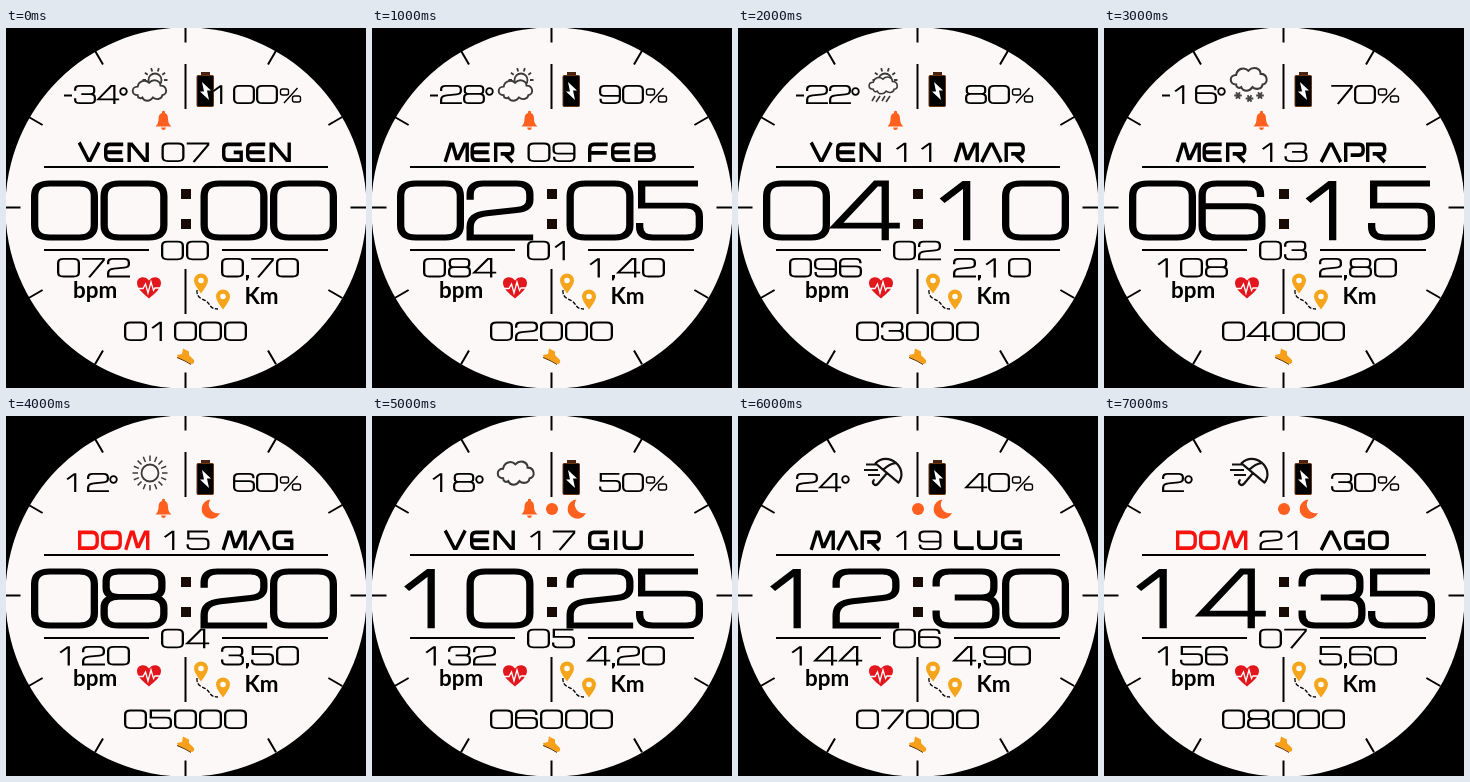
An HTML page that plays this animation: 360 by 360 pixels, repeating every 8000 ms.

```html
<!DOCTYPE html>
<html lang="it">
<head>
<meta charset="utf-8">
<style>
html, body { margin: 0; width: 100%; height: 100%; overflow: hidden; background: #000; }
svg { display: block; width: 100vw; height: 100vh; }
.ink { fill: none; stroke: #000; }
.label { font: 700 22.4px Lato, sans-serif; }
</style>
</head>
<body>
<svg viewBox="0 0 360 360" role="img" aria-label="Quadrante digitale">
  <rect width="360" height="360"/>
  <circle cx="180" cy="180" r="180.600" fill="#fdf8f8"/>
  <g id="ticks" class="ink" stroke-width="2"></g>
  <path class="ink" stroke-width="2" d="M179.5 36V81M38 139H322M38 222H143M216 222H322M179.5 241V286"/>
  <path d="M175 161h10v10h-10zM175 191h10v10h-10z" fill="#180b06"/>
  <text class="label" x="67" y="269.500">bpm</text>
  <text class="label" x="238.500" y="275.500">Km</text>

  <g id="battery">
    <path d="M195 44h9v4h-9z" fill="#4a2410"/>
    <rect x="191" y="47.500" width="16.500" height="31" rx="1" stroke="#6b3512"/>
    <path d="M196 54L205 62.500H201L203 72L194 63.500H198Z" fill="#fff"/>
  </g>

  <g id="heart">
    <path d="M143 270.500C137 265.500 131 260.500 131 255C131 248.500 139.500 247 143 252.500C146.500 247 155 248.500 155 255C155 260.500 149 265.500 143 270.500Z" fill="#e2171d"/>
    <path d="M131 260.500H137L139.500 256L142 265L145 254L147.500 262.500L149 260H155" fill="none" stroke="#fff" stroke-width="1.300"/>
  </g>

  <g id="route">
    <path d="M191 262C190 270 197 271 200 273C205 276 203 281 212 281" class="ink" stroke-width="1.300" stroke-dasharray="4 1.500"/>
    <g id="pins" fill="#f5a51c"></g>
  </g>

  <g id="shoe">
    <path d="M177 320.500L183 323.500V327L188 332Q189 336 185 336L179 332.500L172 330L171 327L176 326Z" fill="#f9a01b"/>
    <path d="M171 329.500L179 333L185 336.500" fill="none" stroke="#5a3200"/>
  </g>

  <g id="live"></g>
</svg>
<script>
const $ = id => document.getElementById(id);
const STEP = 1000, COUNT = 8;
const ORANGE = '#ff5f1f', RED = '#f8120e', GREY = '#3a3a3a', PAPER = '#fdf8f8';

// Digit centre lines on a 9 x 10 grid
const DIGITS = [
  'M2.3 0H6.700Q9 0 9 2.300V7.700Q9 10 6.700 10H2.300Q0 10 0 7.700V2.300Q0 0 2.300 0Z',
  'M.9 3.200L4.200 .1H4.600V10.500',
  'M0 3V2Q0 0 2 0H7Q9 0 9 2V3Q9 4.700 7 4.900L2.500 5.500Q0 5.800 0 8V10H9.500',
  'M0 2.800V2Q0 0 2 0H6.900Q8.700 0 8.700 1.800V3Q8.700 4.800 6.900 4.800H2.800M6.900 4.800Q9 4.800 9 6.900V8Q9 10 7 10H2Q0 10 0 8V7.200',
  'M9.600 7.800H0L6 0H7.400V10.500',
  'M8.800 0H.3V4.100H7Q9 4.100 9 6.100V8Q9 10 7 10H2Q0 10 0 8V7.300',
  'M8.800 2.500V2Q8.800 0 6.800 0H2.200Q0 0 0 2.200V7.800Q0 10 2.200 10H6.800Q9 10 9 8V6.200Q9 4.200 6.800 4.200H0',
  'M-.4 0H8.900V.8L2.600 10.500',
  'M2.200 4.700Q.3 4.700 .3 3V1.800Q.3 0 2.200 0H6.800Q8.700 0 8.700 1.800V3Q8.700 4.700 6.800 4.700ZM2.200 4.700H6.800Q9 4.700 9 6.700V8Q9 10 6.800 10H2.200Q0 10 0 8V6.700Q0 4.700 2.200 4.700Z',
  'M.2 7.500V8Q.2 10 2.200 10H6.800Q9 10 9 7.800V2.200Q9 0 6.800 0H2.200Q0 0 0 2V3.800Q0 5.800 2.200 5.800H9'
];

// Letters: [advance, centre line], 14 units high
const BOX = 'M4 0H13.500Q17.500 0 17.500 4V10Q17.500 14 13.500 14H4Q0 14 0 10V4Q0 0 4 0Z';
const LETTERS = {
  A: [24, 'M-.5 15.700L8.300 0H10.300L19 15.700'],
  B: [24, 'M0 0H14Q17 0 17 3V4Q17 7 14 7H0M14 7Q18 7 18 10.500Q18 14 14 14H0V0'],
  D: [23, 'M0 0H12.500Q17.500 0 17.500 5V9Q17.500 14 12.500 14H0Z'],
  E: [23.5, 'M17.500 0H4Q0 0 0 4V10Q0 14 4 14H17.500M0 7H16.500'],
  F: [23, 'M18 0H4Q0 0 0 4V15.700M0 7.500H17'],
  G: [24, 'M18 0H4Q0 0 0 4V10Q0 14 4 14H17.500V7.200H10'],
  I: [10.5, 'M2 -1.700V15.700'],
  L: [23, 'M0 -1.700V10Q0 14 4 14H18'],
  M: [26.5, 'M-.5 15.700L5 0H7L11 12.500H12.500L19 0H21.500V15.700'],
  N: [24, 'M0 15.700V0H2.500L15.500 14H18V-1.700'],
  O: [23.5, BOX],
  P: [22, 'M0 15.700V0H13.500Q17.500 0 17.500 4V5.500Q17.500 9.500 13.500 9.500H5'],
  R: [23, 'M0 15.700V0H13.500Q17 0 17 3.400V5Q17 8.400 13.500 8.400H5M9 8.400L17 15.700'],
  U: [24, 'M0 -1.700V10Q0 14 4 14H13Q17 14 17 10V-1.700'],
  V: [26, 'M-.5 -1.700L8.600 14H10.600L19.500 -1.700']
};

const line = (d, w, color = '#000', extra = '') =>
  `<path d="${d}" fill="none" stroke="${color}" stroke-width="${w}" ${extra}/>`;
const pad = (n, len) => String(n).padStart(len, '0');

function digits(str, x, y, { w = 23, h = 19.4, pitch = 25, bold = 1, sw = 2.3, sh = 1.8 } = {}) {
  let out = '';
  for (const c of str) {
    if (c === ',') {
      out += `<path d="M${x} ${y + h - 2.5}h3v2.500l-1.500 3h-1.500z"/>`;
      x += 5;
    } else if (c === '-') {
      out += line(`M${x} ${y + 10.5}h8`, 2);
      x += 10;
    } else {
      const kx = (w - sw) / 9, ky = (h - sh) / 10;
      out += line(DIGITS[c], bold, '#000',
        `transform="translate(${x + sw / 2} ${y + sh / 2}) scale(${kx} ${ky})"`);
      x += pitch;
    }
  }
  return out;
}

function word(str, x, color) {
  let out = '';
  x += 1.7;
  for (const c of str) {
    out += line(LETTERS[c][1], 3.4, color, `transform="translate(${x} 116.400) scale(1 1.120)"`);
    x += LETTERS[c][0];
  }
  return out;
}

function rays(cx, cy, r1, r2, n, from = 0, to = n) {
  let d = '';
  for (let i = from; i < to; i++) {
    const a = i / n * 2 * Math.PI, c = Math.cos(a), s = Math.sin(a);
    d += `M${cx + r1 * c} ${cy + r1 * s}L${cx + r2 * c} ${cy + r2 * s}`;
  }
  return d;
}

// Lobed cloud, about 36 x 23, scaled
const cloud = (x, y, kx = 1, ky = 1) =>
  `<path d="M6 17C-1 17 -1 8 6 8C7 2 14 0 18 4C23 -1 30 2 30 7C37 7 38 16 32 17C31 22 25 22 22 19.500C19 24 13 24 11 19.500C9 21 6 20 6 17Z" fill="${PAPER}" stroke="${GREY}" stroke-width="2" transform="translate(${x} ${y}) scale(${kx} ${ky})"/>`;

const sunTop = (x, y) => line(rays(x, y, 9, 12.5, 10, 4, 11), 1.8, GREY) +
  `<circle cx="${x}" cy="${y}" r="6.500" fill="none" stroke="${GREY}" stroke-width="1.800"/>`;

const SKY = {
  partly: sunTop(149, 52) + cloud(126, 51, 0.95, 0.95),
  rain: sunTop(147, 52) + cloud(130.5, 48, 0.8, 0.78) +
    line('M137 68l-3 5M142 68l-4 6M147 68l-3 5M152 68l-4 6', 1.6, GREY),
  snow: cloud(126, 38.5, 1.02, 1.06) +
    [[134, 67.5], [145.5, 70.5], [156, 67.5]].map(([x, y]) => line(rays(x, y, 0, 3.8, 6), 1.8, '#444')).join(''),
  sun: `<circle cx="144" cy="57" r="8.500" fill="none" stroke="${GREY}" stroke-width="1.800"/>` +
    line(rays(144, 57, 12, 17.5, 16), 1.5, GREY),
  cloud: cloud(125, 44, 1.02, 1.08),
  umbrella: line('M-15 0C-14 -18 14 -18 15 0ZM0 0V14Q0 17 -3 17Q-5.500 17 -5.500 14M-5 0Q-4 -9 0 -13', 2.2, '#111',
    'stroke-linejoin="round" stroke-linecap="round" transform="translate(149 57) rotate(40)"') +
    line('M128 48.500H138M126 54H140M130 59H142', 1.8, '#111')
};

const ALERTS = {
  b: `<path d="M149.500 98.500Q152.500 96 152.500 91Q152.500 86 156 85V83.500Q157.500 82 159 83.500V85Q162 86 162 91Q162 96 165.500 98.500ZM155 99.500H160Q159.500 102 157.500 102Q155.500 102 155 99.500Z" fill="${ORANGE}"/>`,
  w: `<circle cx="180" cy="93" r="6" fill="${ORANGE}"/>`,
  m: `<path d="M204.500 83.500A9.600 9.600 0 1 0 214 97A8.800 8.800 0 0 1 204.500 83.500Z" fill="${ORANGE}"/>`
};

// day, month, temperature, sky, alerts
const DAYS = [
  ['VEN', 'GEN', '-34', 'partly', 'b'],
  ['MER', 'FEB', '-28', 'partly', 'b'],
  ['VEN', 'MAR', '-22', 'rain', 'b'],
  ['MER', 'APR', '-16', 'snow', 'b'],
  ['DOM', 'MAG', '12', 'sun', 'bm'],
  ['VEN', 'GIU', '18', 'cloud', 'bwm'],
  ['MAR', 'LUG', '24', 'umbrella', 'wm'],
  ['DOM', 'AGO', '2', 'umbrella', 'wm']
];

const BIG = { w: 67, h: 60, pitch: 69.5, bold: 1.1, sw: 7.3, sh: 5.9 };
const TOP = { w: 22, h: 19, pitch: 23 };
const PERCENT = line('M276.500 61h4q2 0 2 2v2q0 2 -2 2h-4q-2 0 -2 -2v-2q0 -2 2 -2ZM288.500 68h4q2 0 2 2v2q0 2 -2 2h-4q-2 0 -2 -2v-2q0 -2 2 -2ZM291.500 60L278 75', 1.4);

function face(i) {
  const [day, month, temp, sky, alerts] = DAYS[i];
  const charge = String(100 - 10 * i);
  const km = ((i + 1) * 0.7).toFixed(2).replace('.', ',');
  const tempW = [...temp].reduce((s, c) => s + (c === '-' ? 10 : TOP.pitch), 0);
  return digits(temp, 58, 57, TOP) +
    `<circle cx="${58 + tempW + 3.5}" cy="63.500" r="3.300" class="ink" stroke-width="1.800"/>` +
    SKY[sky] + [...alerts].map(a => ALERTS[a]).join('') +
    digits(charge, 273 - charge.length * TOP.pitch, 57, TOP) + PERCENT +
    word(day, 72, day === 'DOM' ? RED : '#000') +
    digits(pad(7 + 2 * i, 2), 155.5, 114.6) +
    word(month, 216, '#000') +
    digits(pad(2 * i, 2), 25, 152.5, BIG) +
    digits(pad(5 * i, 2), 194.5, 152.5, BIG) +
    digits(pad(i, 2), 155, 212.8) +
    digits(pad(72 + 12 * i, 3), 51, 230) +
    digits(km, 215, 230) +
    digits(pad(1000 * (i + 1), 5), 118, 293.6);
}

$('ticks').innerHTML = `<path d="${rays(179.5, 179.5, 165, 181, 12)}"/>`;
$('pins').innerHTML = [[195, 252.5], [217, 268.5]].map(([x, y]) =>
  `<path d="M${x} ${y + 13}Q${x - 7} ${y + 4} ${x - 7} ${y}a7 7 0 0 1 14 0Q${x + 7} ${y + 4} ${x} ${y + 13}Z"/>` +
  `<circle cx="${x}" cy="${y}" r="2.800" fill="#fff"/>`).join('');

let shown = -1;
const start = performance.now();
function update(now) {
  const i = Math.floor(Math.max(0, now - start) / STEP) % COUNT;
  if (i !== shown) $('live').innerHTML = face(shown = i);
  requestAnimationFrame(update);
}
update(start);
</script>
</body>
</html>
```
